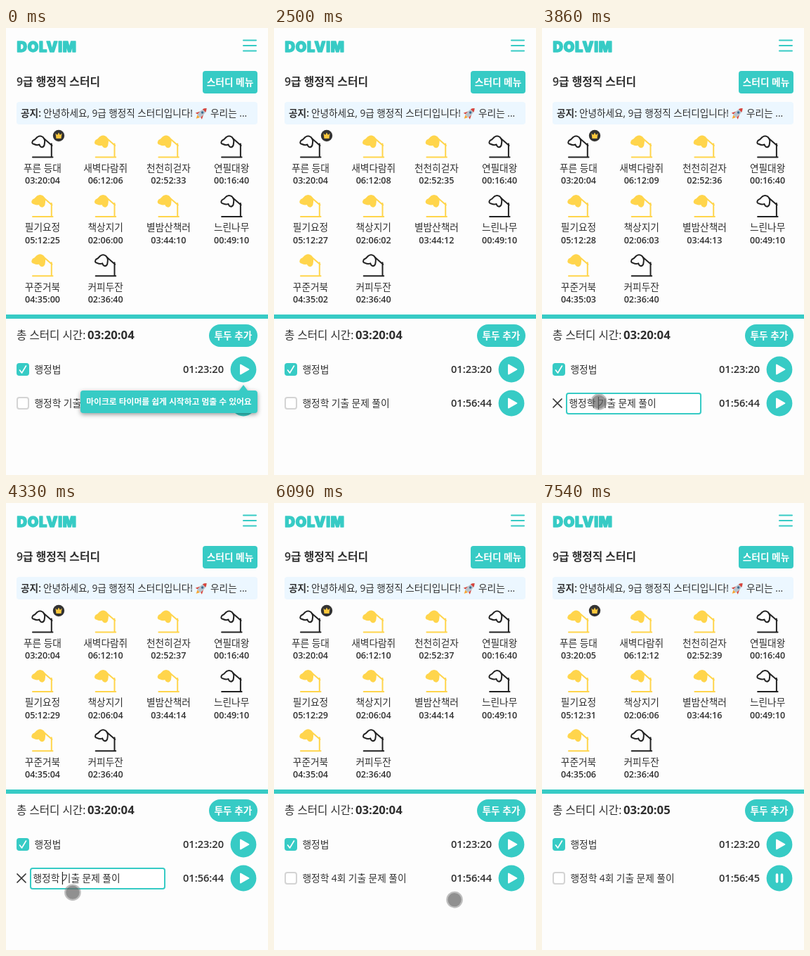
Write an HTML page that moves like this. It is 373x635 px and loops after 8 s.

```html
<!DOCTYPE html>
<html lang="ko">
<head>
<meta charset="utf-8">
<title>스터디 타이머</title>
<style>
  html, body { margin: 0; width: 100%; height: 100%; overflow: hidden; background: #fdfdfd; }
  svg { display: block; width: 373px; height: 635px; }
  text { font-family: "Open Sans", "Noto Sans CJK KR", "Noto Sans CJK", sans-serif; font-size: 13.7px; fill: #2f2f2f; white-space: pre; }
  .mid { text-anchor: middle; }
  .end { text-anchor: end; }
  .bold { font-weight: 700; }
  .semi { font-weight: 600; }
  .white { fill: #fff; }
  .teal { fill: #37cbc5; }
  .brand { font: 900 20px Inter, sans-serif; fill: #37cbc5; stroke: #37cbc5; stroke-width: 1.4; stroke-linejoin: round; letter-spacing: .8px; }
  .small { font-size: 12.6px; font-weight: 600; }
  .clock { font-size: 14.6px; font-weight: 600; }
  .lamp { stroke: #222; stroke-width: 2; stroke-linecap: round; stroke-linejoin: round; fill: none; }
  .lamp.lit { stroke: #ffd54c; }
  .lamp.lit .shade { fill: #ffd54c; }
  .line { fill: none; stroke-linecap: round; stroke-linejoin: round; stroke-width: 2; }
  .tip { filter: drop-shadow(0 2px 3px rgba(0, 0, 0, .4)); }
</style>
</head>
<body>
<svg viewBox="0 0 373 635">
  <defs>
    <g id="play">
      <circle r="18.4" class="teal"/>
      <path d="M-4-6.4V6.4L7.4 0Z" fill="#fff" stroke="#fff" stroke-width="2" stroke-linejoin="round"/>
    </g>
    <g id="pause">
      <circle r="18.4" class="teal"/>
      <path d="M-3.5-5V5M3.5-5V5" stroke="#fff" stroke-width="3.6" stroke-linecap="round"/>
    </g>
  </defs>

  <text class="brand" x="15.5" y="33.5">DOLVIM</text>
  <path class="line" stroke="#37cbc5" d="M338 17.5H356M338 25H356M338 32.5H356"/>

  <text class="semi" x="15" y="82" style="font-size:15.8px">9급 행정직 스터디</text>
  <rect class="teal" x="280" y="61" width="78" height="32" rx="4"/>
  <text class="mid bold white" x="319" y="82">스터디 메뉴</text>

  <rect x="15" y="105" width="343" height="32" rx="4" fill="#ecf7ff"/>
  <text class="semi" x="21" y="126">공지:</text>
  <text x="53" y="126" style="font-size:13.6px">안녕하세요, 9급 행정직 스터디입니다!</text>
  <text x="291" y="126">우리는 ...</text>
  <g transform="translate(278.5 121) rotate(45)">
    <path d="M-2.5 6L0 11L2.5 6Z" fill="#f7a531"/>
    <path d="M-3-1L-6.5 6L-3 5ZM3-1L6.5 6L3 5Z" fill="#d8433b"/>
    <path d="M0-10Q5-4 3 6H-3Q-5-4 0-10Z" fill="#b9c3cc"/>
    <path d="M0-10Q2.4-7.5 3.1-5H-3.1Q-2.4-7.5 0-10Z" fill="#d8433b"/>
    <circle cy="-1.5" r="1.7" fill="#3d6d92"/>
  </g>

  <g id="members"></g>
  <circle cx="75" cy="153" r="8.2" fill="#333"/>
  <path d="M70.5 149.5L73 152L75 148.5L77 152L79.5 149.5L78.5 157H71.5Z" fill="#ffc83d"/>

  <rect class="teal" y="407" width="373" height="6"/>
  <text x="15" y="442" style="font-size:15.6px;font-weight:500">총 스터디 시간:</text>
  <text id="total" class="bold" x="116" y="442" style="font-size:16.7px"></text>
  <rect class="teal" x="289" y="421" width="69" height="32" rx="16"/>
  <text class="mid bold white" x="323.5" y="442">투두 추가</text>

  <rect class="teal" x="15" y="476" width="18" height="18" rx="4"/>
  <path class="line" stroke="#fff" d="M19.5 486L22.5 490L28.5 480" style="stroke-width:1.6"/>
  <text x="40.5" y="490">행정법</text>
  <text class="end clock" x="310" y="490.3">01:23:20</text>
  <use href="#play" x="338" y="485"/>

  <g id="view">
    <rect x="16" y="525" width="16" height="16" rx="3" fill="#fff" stroke="#d4d4d4" stroke-width="2"/>
    <text id="label" x="40.5" y="538"></text>
  </g>
  <g id="edit">
    <path class="line" stroke="#333" d="M16 527L28 539M28 527L16 539" style="stroke-width:1.7"/>
    <rect x="35" y="519" width="191" height="29" rx="3" fill="#fff" stroke="#37cbc5" stroke-width="2"/>
    <text id="input" x="38.5" y="538"></text>
    <rect id="caret" y="524" width="1.2" height="18" fill="#222"/>
  </g>
  <text id="task" class="end clock" x="310" y="538.3"></text>
  <use id="button" x="338" y="533"/>

  <g id="tip">
    <path class="teal tip" d="M110 515H332L338 507L344 515H354Q358 515 358 519V543Q358 547 354 547H110Q106 547 106 543V519Q106 515 110 515Z"/>
    <text class="mid bold white" x="232" y="535.3" style="font-size:11.8px">마이크로 타이머를 쉽게 시작하고 멈출 수 있어요</text>
  </g>

  <g id="pointer">
    <circle r="11.8" fill="#808080" fill-opacity=".5"/>
    <circle id="core" r="9.6" fill="#505050"/>
  </g>
</svg>

<script>
const LOOP = 8000;
const $ = id => document.getElementById(id);

// name, seconds studied, running
const hms = (h, m, s) => h * 3600 + m * 60 + s;
const members = [
  ['푸른 등대', hms(3, 20, 4), false],
  ['새벽다람쥐', hms(6, 12, 6), true],
  ['천천히걷자', hms(2, 52, 33), true],
  ['연필대왕', hms(0, 16, 40), false],
  ['필기요정', hms(5, 12, 25), true],
  ['책상지기', hms(2, 6, 0), true],
  ['별밤산책러', hms(3, 44, 10), true],
  ['느린나무', hms(0, 49, 10), false],
  ['꾸준거북', hms(4, 35, 0), true],
  ['커피두잔', hms(2, 36, 40), false]
];

const ticks = [910, 1900, 2900, 3900, 6410, 7540];
const typing = [[0, ''], [4470, '4'], [4600, '4호'], [4670, '4회'], [5000, '4회 ']];
const OPEN = 3730, CLOSE = 5200, START = 6550, OWN_TICK = 7540;

const smooth = u => u * u * (3 - 2 * u);
const easeIn = u => u * u;
const easeOut = u => 1 - (1 - u) * (1 - u);

// time, x, y, easing towards this point
const path = [
  [2740, 150, 645],
  [3330, 81, 531, smooth],
  [4250, 81, 531, smooth],
  [4450, 118, 590, smooth],
  [5870, 118, 590, smooth],
  [6067, 257.5, 563.5, easeIn],
  [6400, 329, 542, easeOut]
];

const clock = s => [s / 3600, s / 60 % 60, s % 60]
  .map(v => String(Math.floor(v)).padStart(2, '0')).join(':');

const setText = (el, s) => { if (el.textContent !== s) el.textContent = s; };
const show = (el, on) => el.style.display = on ? '' : 'none';
const within = (t, a, b) => t >= a && t < b;

$('members').innerHTML = members.map(([name], i) => `
  <g transform="translate(${52 + i % 4 * 89.7} ${Math.floor(i / 4) * 84.4})">
    <g class="lamp">
      <path d="M-14 183.5H14.5M12.8 183V164.5M2 157L13.5 167"/>
      <path class="shade" d="M-12 165Q-15.5 164.5-14.5 161.5Q-14 159.5-11 158.5L-7.5 155Q-3.5 152 .5 155Q4 158.5 3 163L2.5 166.5Q1 170-2 169Q-4 168-4.5 165.5Q-8 167-12 165Z"/>
    </g>
    <text class="mid" y="204">${name}</text>
    <text class="mid small" y="221.4"></text>
  </g>`).join('');
const lamps = [...document.querySelectorAll('.lamp')];
const times = [...document.querySelectorAll('.small')];

function pointerAt(t) {
  const s = Math.floor(t * .015 + .1) / .015; // pointer moves at 15 steps a second
  const i = path.findIndex(p => p[0] > s);
  if (i < 0) return path[path.length - 1].slice(1, 3);
  if (i === 0) return path[0].slice(1, 3);
  const [t0, x0, y0] = path[i - 1], [t1, x1, y1, ease] = path[i];
  const k = ease((s - t0) / (t1 - t0));
  return [x0 + (x1 - x0) * k, y0 + (y1 - y0) * k];
}

function draw(t) {
  const n = ticks.filter(v => t >= v).length;
  const own = t >= OWN_TICK ? 1 : 0;
  members.forEach(([, base, running], i) => {
    setText(times[i], clock(base + (running ? n : i ? 0 : own)));
    lamps[i].classList.toggle('lit', running || (i === 0 && t >= START));
  });
  setText($('total'), clock(members[0][1] + own));
  setText($('task'), clock(hms(1, 56, 44) + own));
  $('button').setAttribute('href', t >= START ? '#pause' : '#play');
  show($('tip'), t < 2500);

  const editing = within(t, OPEN, CLOSE);
  const typed = typing.filter(k => t >= k[0]).pop()[1];
  const head = '행정학 ' + typed, full = head + '기출 문제 풀이';
  show($('view'), !editing);
  show($('edit'), editing);
  setText($('label'), full);
  if (editing) {
    setText($('input'), full);
    $('caret').setAttribute('x', 38.5 + $('input').getSubStringLength(0, head.length));
  }

  const [x, y] = pointerAt(t);
  show($('pointer'), within(t, 2850, 6620));
  $('pointer').setAttribute('transform', `translate(${x} ${y})`);
  const pressed = within(t, 3380, OPEN) || t >= 6410;
  $('core').setAttribute('fill-opacity', pressed ? .65 : .42);
}

function frame() {
  draw(performance.now() % LOOP);
  requestAnimationFrame(frame);
}
frame();
</script>
</body>
</html>
```
